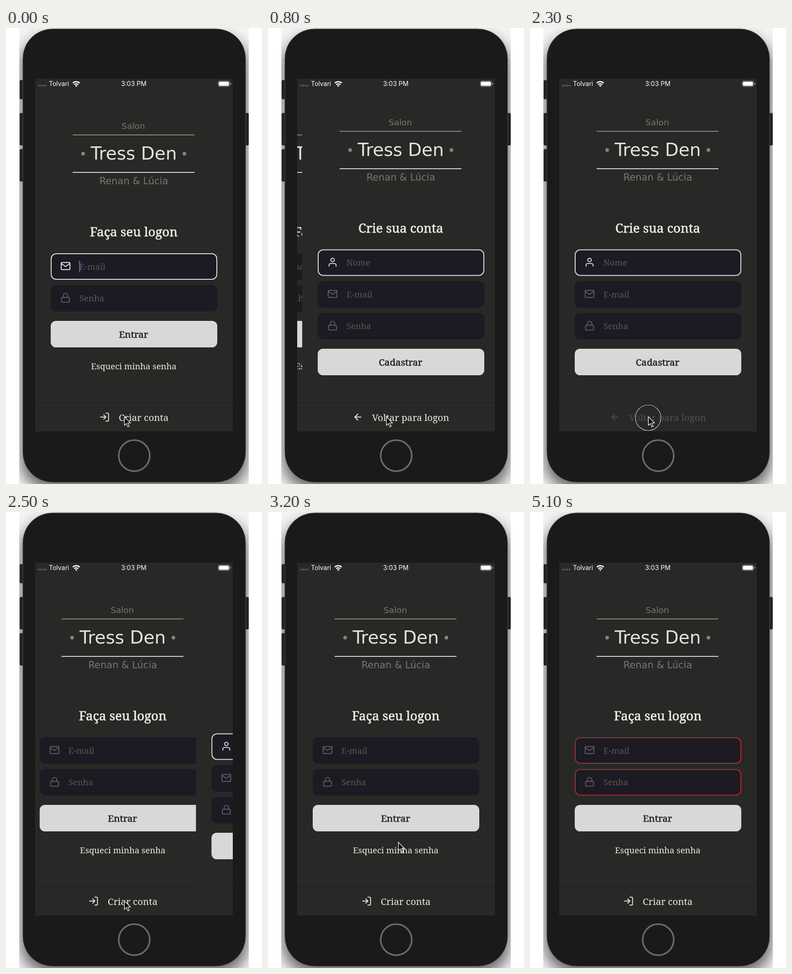
Animation of 561x998 px, one loop 5200 ms. Source, as an HTML page:

```html
<!DOCTYPE html>
<html lang="pt">
<head>
<meta charset="utf-8">
<title>Logon</title>
<style>
html, body { margin: 0; width: 100%; height: 100%; overflow: hidden; background: #fff; }
svg { display: block; width: 561px; height: 998px; }
text { font-family: "Roboto Slab", "Noto Serif", serif; fill: #f0ece6; }
.mid { text-anchor: middle; }
.title { font-size: 27.6px; stroke: #f0ece6; stroke-width: .7; }
.hint { font-size: 18.5px; fill: #5b5856; }
.small { font-size: 18.5px; }
.foot { font-size: 20.5px; }
.btn { font-size: 20.6px; fill: #29272d; stroke: #29272d; stroke-width: .7; }
.logo text { font-family: "DejaVu Sans", sans-serif; text-anchor: middle; fill: #777671; }
.logo .name { font-size: 39px; fill: #e6e2dc; }
.status text { font: 14px Inter, sans-serif; fill: #fff; }
.field rect { fill: #1c1a22; stroke: #1c1a22; stroke-width: 2; }
.icon { fill: none; stroke: #615e5c; stroke-width: 2; stroke-linecap: round; stroke-linejoin: round; }
.focus rect { stroke: #dcdcdc; }
.focus .icon, .footer .icon { stroke: #e8e6e2; }
.error rect { stroke: #b3292c; }
.field .caret { fill: #4460e0; stroke: none; visibility: hidden; }
</style>
</head>
<body>
<svg viewBox="0 0 561 998">
  <defs>
    <clipPath id="shot"><rect x="29" width="503" height="998"/></clipPath>
    <clipPath id="view"><rect x="64" y="111" width="433" height="772"/></clipPath>
    <filter id="blur" x="-20%" y="-20%" width="140%" height="140%"><feGaussianBlur stdDeviation="16"/></filter>
    <path id="mail" d="M4 4h16a2 2 0 0 1 2 2v12a2 2 0 0 1-2 2H4a2 2 0 0 1-2-2V6a2 2 0 0 1 2-2zM22 6l-10 7L2 6"/>
    <path id="lock" d="M5 11h14a2 2 0 0 1 2 2v7a2 2 0 0 1-2 2H5a2 2 0 0 1-2-2v-7a2 2 0 0 1 2-2zM7 11V7a5 5 0 0 1 10 0v4"/>
    <path id="user" d="M20 21v-2a4 4 0 0 0-4-4H8a4 4 0 0 0-4 4v2M16 7a4 4 0 1 1-8 0a4 4 0 0 1 8 0"/>
    <path id="enter" d="M15 3h4a2 2 0 0 1 2 2v14a2 2 0 0 1-2 2h-4M10 17l5-5-5-5M15 12H3"/>
    <path id="back" d="M19 12H5M12 19l-7-7 7-7"/>
  </defs>

  <g clip-path="url(#shot)">
    <rect x="29" width="503" height="998" fill="#f5f3f6"/>
    <rect x="33" y="20" width="496" height="990" rx="62" fill="#000" opacity=".6" filter="url(#blur)"/>
    <g fill="#232323">
      <rect x="30" y="114" width="12" height="42" rx="3"/>
      <rect x="30" y="186" width="12" height="71" rx="3"/>
      <rect x="30" y="265" width="12" height="71" rx="3"/>
      <rect x="520" y="186" width="12" height="71" rx="3"/>
    </g>
    <rect x="37" y="2" width="488" height="992" rx="65" fill="#1a1a1a" stroke="#4b4b4b"/>
  </g>
  <circle cx="281" cy="936" r="34" fill="none" stroke="#6b6b6b" stroke-width="3.5"/>

  <g clip-path="url(#view)">
    <g id="login"></g>
    <g id="signup"></g>
    <g class="status">
      <g fill="#5a5a5a"><circle cx="72" cy="126" r="2"/><circle cx="77" cy="126" r="2"/><circle cx="82" cy="126" r="2"/><circle cx="87" cy="126" r="2"/></g>
      <text x="94" y="127">Tolvari</text>
      <g fill="none" stroke="#fff" stroke-width="2.6">
        <path d="M146.5 120.5a11 11 0 0 1 15 0M149.5 124a6.5 6.5 0 0 1 9 0"/>
        <path d="M154 129l-2.5-2.7a3.5 3.5 0 0 1 5 0z" fill="#fff" stroke="none"/>
      </g>
      <text class="mid" x="280" y="127">3:03 PM</text>
      <rect x="465" y="116" width="25" height="12" rx="3.5" fill="none" stroke="#a0a0a0"/>
      <rect x="466.5" y="117.5" width="22" height="9" rx="2.2" fill="#fff"/>
      <path d="M491.5 120a2 2 0 0 1 0 4z" fill="#a0a0a0"/>
    </g>
  </g>

  <g id="tap" fill="none">
    <circle r="28" stroke="#111" stroke-width="3"/>
    <circle r="28" stroke="#ddd" stroke-width="1.2"/>
  </g>
  <path id="cursor" d="M0 0v18.5l4.3-4 3.2 7.5 3-1.3-3.2-7.3h5.9z" fill="#000" stroke="#fff" stroke-width="1.3"/>
</svg>
<script>
const $ = id => document.getElementById(id);

const icon = (name, cx, cy) =>
  `<use class="icon" href="#${name}" transform="translate(${cx} ${cy}) scale(.9625) translate(-12 -12)"/>`;

const field = (y, name, hint) => `<g class="field">
  <rect x="99" y="${y + 1}" width="363" height="56" rx="11"/>
  ${icon(name, 130.5, y + 28)}
  <text class="hint" x="161" y="${y + 35.5}">${hint}</text>
  <rect class="caret" x="160" y="${y + 16}" width="2.5" height="26"/></g>`;

const logo = (y, tint) => `<g class="logo" transform="translate(0 ${y})">
  <text x="279" y="21" font-size="18.5">Salon</text>
  <path d="M146 34h267" stroke="${tint}" stroke-width="2"/>
  <text class="name" x="280" y="88">Tress Den</text>
  <circle cx="169" cy="75" r="4" fill="#85837e"/><circle cx="391" cy="75" r="4" fill="#85837e"/>
  <path d="M146 116h267" stroke="#d4d2d4" stroke-width="2"/>
  <text x="280" y="142" font-size="21">Renan &amp; Lúcia</text></g>`;

const button = (y, label) => `<rect x="98" y="${y}" width="365" height="58" rx="11.5" fill="#d8d8d8"/>
  <text class="btn mid" x="279.5" y="${y + 36.5}">${label}</text>`;

const page = (top, tint, title, body, name, iconX, textX, link) => `
  <rect x="64" y="111" width="433" height="772" fill="#282827"/>
  ${logo(top, tint)}
  <text class="title mid" x="280" y="${top + 256}">${title}</text>
  ${body}
  <g class="footer"><path d="M64 819.5h433" stroke="#1b1a1c" stroke-width="1.2"/>
  ${icon(name, iconX, 851.5)}<text class="foot" x="${textX}" y="860">${link}</text></g>`;

$('login').innerHTML = page(200, '#87876e', 'Faça seu logon',
  field(493, 'mail', 'E-mail') + field(562.5, 'lock', 'Senha') + button(641, 'Entrar') +
  '<text class="small mid" x="280" y="747">Esqueci minha senha</text>',
  'enter', 216, 247, 'Criar conta');
$('signup').innerHTML = page(192, '#85858c', 'Crie sua conta',
  field(484.5, 'user', 'Nome') + field(554, 'mail', 'E-mail') + field(623.5, 'lock', 'Senha') +
  button(702, 'Cadastrar'),
  'back', 186, 217, 'Voltar para logon');

const fields = [...document.querySelectorAll('#login .field')];
const [loginFoot, signupFoot] = document.querySelectorAll('.footer');
const [loginCaret, , nameCaret] = document.querySelectorAll('.caret');
document.querySelector('#signup .field').classList.add('focus');

const LOOP = 5200, STEP = 100, WIDTH = 433;
const OPEN = 450, CLOSE = 2340, FAIL = 3550;
const within = (t, a, b) => t >= a && t < b;
const clamp = x => Math.min(1, Math.max(0, x));
const show = (el, on) => { el.style.visibility = on ? 'visible' : 'hidden'; };
const move = (el, x, y) => el.setAttribute('transform', `translate(${x.toFixed(2)} ${y.toFixed(2)})`);

// Overdamped spring from 1 that snaps to rest when nearly there
const settle = ms => {
  const rest = Math.exp(-0.0105 * Math.max(0, ms));
  return rest < 0.005 ? 0 : rest;
};

function draw(t) {
  // Distance of the sign-up page from its resting place, 1 = off screen
  const away = t < CLOSE ? settle(t - OPEN) : 1 - settle(t - CLOSE);
  move($('signup'), WIDTH * away, 0);
  move($('login'), -0.3 * WIDTH * (1 - away), 0);

  loginFoot.style.opacity = within(t, 300, 1200) ? 0.2 + 0.8 * clamp((t - OPEN) / 300) : 1;
  signupFoot.style.opacity = within(t, 2200, 3000) ? 0.2 + 0.8 * clamp((t - CLOSE) / 300) : 1;

  fields[0].classList.toggle('focus', t < OPEN);
  fields.forEach(f => f.classList.toggle('error', t >= FAIL));
  show(loginCaret, t < OPEN && t % 400 < 200);
  show(nameCaret, within(t, OPEN, CLOSE) && (t - 500) % 400 < 200);

  const k = clamp((t - 3000) / 300), e = k * k * (3 - 2 * k);
  const x = 259.5 + 35.5 * e, y = 851 - 173 * e;
  move($('cursor'), x, y);
  show($('cursor'), t < 4000);
  move($('tap'), x - 0.5, y + 2);
  show($('tap'), within(t, 300, 500) || within(t, 2200, 2400) || within(t, 3400, 3600));
}

function tick() {
  const t = performance.now() % LOOP;
  draw(Math.floor(t / STEP) * STEP);
  requestAnimationFrame(tick);
}
tick();
</script>
</body>
</html>
```
